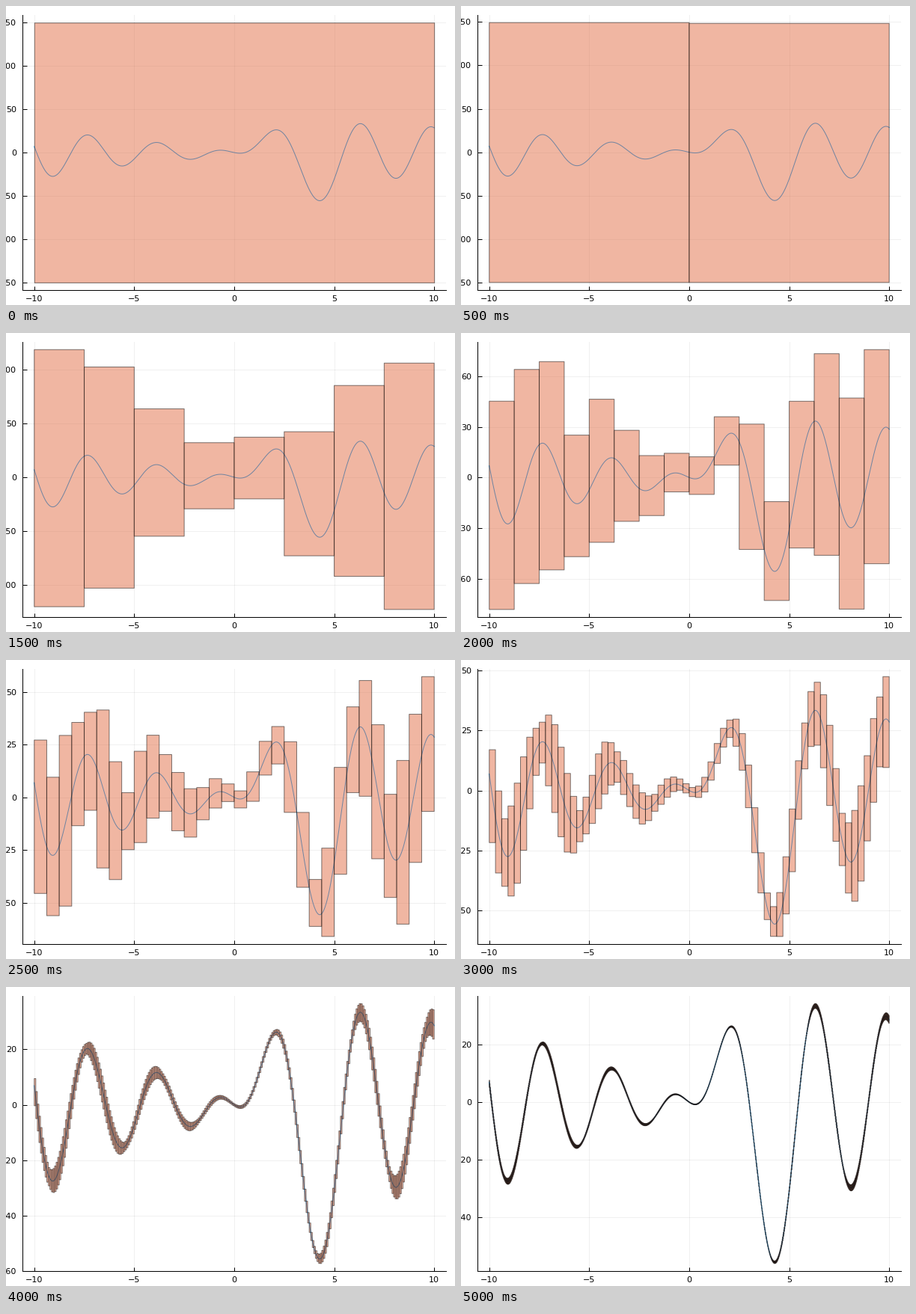
These frames come from a looping animation (600x400 px, 5.5 s). A matplotlib script:

```python
import matplotlib.pyplot as plt
import numpy as np
from matplotlib.animation import FuncAnimation
from matplotlib.collections import PolyCollection

W, H, DPI = 600, 400, 100
PX = 72 / DPI
LEFT, RIGHT, TOP, BOTTOM = 21.7, 588.2, 11.8, 380.3
TERMS = range(1, 6)
STEPS = [50, 50, 50, 50, 30, 25, 25, 25, 20, 20, 20]

plt.rcParams.update({"font.family": "DejaVu Sans", "font.size": 8})


def f(x):
    return -sum(k * x * np.sin(k * (x - 3) / 3) for k in TERMS)


def sin_range(lo, hi):
    """Exact range of sin over the intervals [lo, hi]."""
    def hits(phase):
        m = np.ceil((lo - phase) / (2 * np.pi))
        return phase + 2 * np.pi * m <= hi

    a, b = np.sin(lo), np.sin(hi)
    return (np.where(hits(-np.pi / 2), -1, np.minimum(a, b)),
            np.where(hits(np.pi / 2), 1, np.maximum(a, b)))


def f_range(lo, hi):
    """Interval-arithmetic enclosure of f over [lo, hi]."""
    low, high = 0, 0
    for k in TERMS:
        s0, s1 = sin_range(k * (lo - 3) / 3, k * (hi - 3) / 3)
        products = k * np.array([lo * s0, lo * s1, hi * s0, hi * s1])
        low = low - products.max(axis=0)
        high = high - products.min(axis=0)
    return low, high


fig = plt.figure(figsize=(W / DPI, H / DPI), dpi=DPI, facecolor="white")
ax = fig.add_axes([LEFT / W, 1 - BOTTOM / H, (RIGHT - LEFT) / W, (BOTTOM - TOP) / H])
ax.spines[["top", "right"]].set_visible(False)
for side in ("left", "bottom"):
    ax.spines[side].set_linewidth(PX)
ax.set_axisbelow(True)
ax.grid(color="black", alpha=0.06, lw=PX)
ax.tick_params(direction="in", length=5.5 * PX, width=PX)
ax.tick_params(axis="y", pad=7.6 * PX)
ax.tick_params(axis="x", pad=11 * PX)
ax.set_xticks(range(-10, 11, 5))
for label in ax.get_xticklabels():
    label.set_va("center_baseline")

xs = np.linspace(-10, 10, 1001)
ax.plot(xs, f(xs), color="#009afa", lw=PX, zorder=2, snap=False)
boxes = PolyCollection([], facecolors=(0.888, 0.436, 0.278, 0.5),
                       edgecolors=(0, 0, 0, 0.5), linewidths=PX, zorder=3)
boxes.set_snap(False)
ax.add_collection(boxes, autolim=False)
ax.set_xlim(-10.6, 10.6)


def draw(i):
    edges = np.linspace(-10, 10, 2 ** i + 1)
    a, b = edges[:-1], edges[1:]
    low, high = f_range(a, b)
    corners = [(a, low), (b, low), (b, high), (a, high)]
    boxes.set_verts(np.array(corners).transpose(2, 0, 1))
    bottom, top = low.min(), high.max()
    pad = 0.03 * (top - bottom)
    ax.set_yticks(STEPS[i] * np.arange(-7, 8))
    ax.set_ylim(bottom - pad, top + pad)
    return [boxes]


anim = FuncAnimation(fig, draw, frames=len(STEPS), interval=500,
                     repeat=True, repeat_delay=0, blit=False)
plt.show()
```
